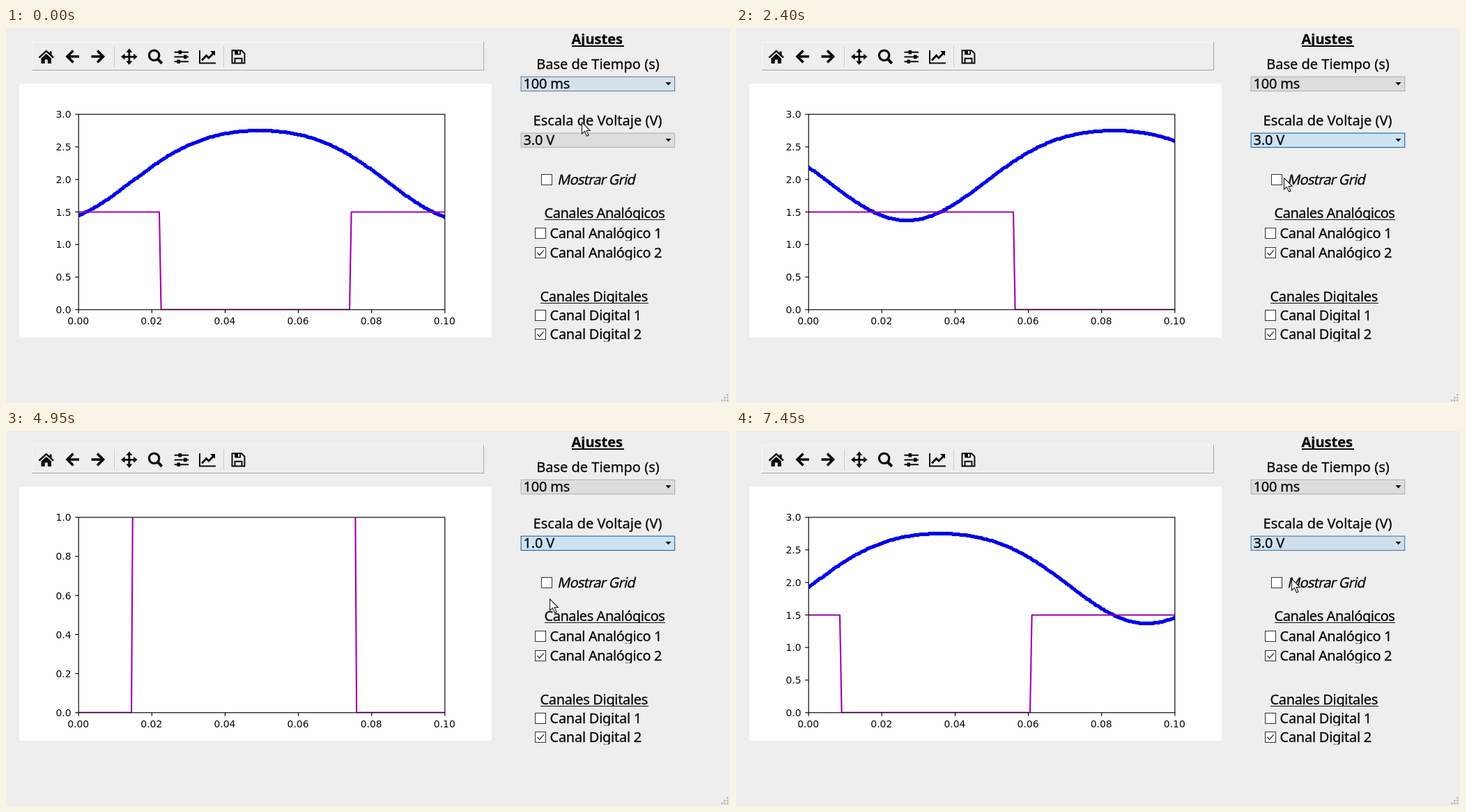
These frames come from a looping animation (1039x539 px, 7.7 s). An HTML page with a canvas:

```html
<!DOCTYPE html>
<html lang="es">
<head>
<meta charset="utf-8">
<title>Ajustes</title>
<style>
html, body { margin: 0; width: 100%; height: 100%; overflow: hidden; background: #eee; }
canvas { display: block; width: 1039px; height: 539px; }
</style>
</head>
<body>
<canvas id="stage"></canvas>
<script>
const W = 1039, H = 539, LOOP = 7700;
const canvas = document.getElementById('stage');
const dpr = window.devicePixelRatio || 1;
canvas.width = W * dpr;
canvas.height = H * dpr;
const g = canvas.getContext('2d');
g.scale(dpr, dpr);

// start ms, x of the wave crest, voltage scale, pointer x, pointer y, mode
const STEPS = [
  [0, 364, '3.0', 826, 135, 'leave'],
  [350, 295, '3.0', 822, 148, 'idle'],
  [700, 225, '3.0', 818, 173, 'hover'],
  [800, 225, '3.0', 818, 173, 'press'],
  [1100, 305, '3.0', 812, 182, 'press'],
  [1500, 420, '3.0', 800, 197, 'press'],
  [2400, 542, '3.0', 786, 215, 'press'],
  [2700, 480, '1.0', 786, 228, 'grid'],
  [3700, 400, '1.0', 786, 242, 'grid'],
  [3850, 400, '1.0', 812, 171, 'hover'],
  [3950, 430, '1.0', 815, 169, 'press'],
  [4300, 257, '1.0', 812, 180, 'press'],
  [4700, 300, '1.0', 792, 216, 'press'],
  [4950, 51, '1.0', 780, 241, 'press'],
  [5300, 180, '0.3', 783, 250, 'fade'],
  [5550, 240, '0.3', 800, 222, 'grid'],
  [6000, 305.6, '0.3', 822, 172, 'hover'],
  [6400, 380, '0.3', 812, 212, 'grid'],
  [6900, 340, '0.3', 806, 200, 'press'],
  [7450, 293, '3.0', 797, 212, 'fade']
];

const TICK = { '3.0': 0.5, '1.0': 0.2, '0.3': 0.05 };
const STATUS = { hover: 'Ajustar escala de voltaje', grid: 'Colocar Grid en la grafica' };
const COMBO = {
  idle: ['#dddddd', '#adadad'],
  leave: ['#d5e1ea', '#55789a'],
  fade: ['#d0dfeb', '#33729f'],
  hover: ['#e5f1fa', '#1878b0'],
  press: ['#cce3f4', '#10558c']
};
const INK = '#0a0a0a', UI = '20px "Noto Sans", sans-serif';
const AXES = { x: 104.2, y: 124.1, w: 525.6, h: 280.7 };
const PERIOD = 593.5, FALL = -144, RISE = 129, SAMPLE = AXES.w / 200;

function rect(x, y, w, h, fill) {
  g.fillStyle = fill;
  g.fillRect(x, y, w, h);
}

function box(x, y, w, h, fill, border) {
  rect(x, y, w, h, border);
  rect(x + 1, y + 1, w - 2, h - 2, fill);
}

function stroke(d, width, color = INK) {
  g.lineWidth = width;
  g.strokeStyle = color;
  g.stroke(new Path2D(d));
}

function fill(d, color = INK) {
  g.fillStyle = color;
  g.fill(new Path2D(d));
}

function text(str, x, y, font, align = 'left') {
  g.font = font;
  g.textAlign = align;
  g.fillStyle = INK;
  g.fillText(str, x, y);
}

// panel text: slightly heavier than regular, with its own tracking
function label(str, x, y, track = 0, align = 'left', font = UI) {
  g.letterSpacing = track + 'px';
  text(str, x, y, font, align);
  g.lineWidth = 0.3;
  g.strokeStyle = INK;
  g.strokeText(str, x, y);
  g.letterSpacing = '0px';
}

function clipped(x, y, w, h, draw) {
  g.save();
  g.beginPath();
  g.rect(x, y, w, h);
  g.clip();
  draw();
  g.restore();
}

function toolbar() {
  rect(37, 20, 649, 41, '#a6a6a6');
  rect(37, 20, 648, 40, '#f8f8f8');
  rect(38, 21, 647, 39, '#eeeeee');
  rect(155, 26, 1, 30, '#cccccc');
  rect(312, 26, 1, 30, '#cccccc');
  // home
  stroke('M47.5 42.5L57.8 33.2L68 42.5', 2.4);
  fill('M50.5 43.5L57.8 37L65 43.5V51H59.8V45.5H55.8V51H50.5Z M62.6 33.5h3v6h-3z');
  // back, forward
  stroke('M89 41H105 M96.5 32.5L88 41L96.5 49.5', 3.7);
  stroke('M122.5 41H138.5 M131 32.5L139.5 41L131 49.5', 3.7);
  // pan
  stroke('M176.8 33V50 M168 41.3H185.5', 2.8);
  fill('M176.8 29.5l4.5 5.5h-9z M176.8 53l4.5-5.5h-9z M165 41.3l5.5-4.5v9z M188.6 41.3l-5.5-4.5v9z');
  // zoom
  stroke('M219.8 39.3a7.2 7.2 0 1 1-14.4 0a7.2 7.2 0 1 1 14.4 0z', 3.2);
  stroke('M217.5 44.5L223.8 50.8', 4);
  // sliders
  stroke('M241.5 34.7H262 M241.5 41.5H262 M241.5 48.3H262', 2);
  fill('M247.5 32h4.5v5.4h-4.5z M255 38.8h4.5v5.4h-4.5z M245.5 45.6h4.5v5.4h-4.5z');
  // chart
  stroke('M278 32V50.5H301', 2);
  stroke('M281 46.5L287.5 39.5L291 43L298 36', 2.9);
  fill('M293 33H300V40Z');
  // save
  stroke('M324.5 32.3H338L342.4 36.7V50.5H324.5Z M328.5 50V43.7H338.5V50', 2);
  fill('M328 32h9v6.5h-9z');
  rect(333, 33, 2.2, 4, '#eeeeee');
}

// flat crest, sharp trough
function wave(px, crest) {
  const a = (px - crest) / PERIOD * 2 * Math.PI;
  return 2.15 + 0.69 * Math.cos(a) - 0.09 * Math.cos(2 * a);
}

function plot(crest, scale) {
  const { x, y, w, h } = AXES, max = +scale;
  const py = v => y + h - v / max * h;
  rect(19, 80, 678, 365, '#fefefe');

  clipped(x, y, w, h + 0.5, () => {
    // one dot per sample, snapped to the pixel grid
    g.fillStyle = '#0000ea';
    for (let i = 0; i <= 200; i++) {
      const px = x + i * SAMPLE;
      g.beginPath();
      g.arc(Math.floor(px) + 0.5, Math.floor(py(wave(px, crest))) + 0.5, 2.75, 0, 7);
      g.fill();
    }

    g.lineJoin = 'round';
    g.beginPath();
    for (let k = -2; k <= 2; k++) {
      const c = crest + k * PERIOD;
      g.lineTo(c + FALL, py(1.5));
      g.lineTo(c + FALL + SAMPLE, py(0));
      g.lineTo(c + RISE, py(0));
      g.lineTo(c + RISE + SAMPLE, py(1.5));
    }
    g.lineWidth = 2.1;
    g.strokeStyle = '#a000a8';
    g.stroke();
    g.lineJoin = 'miter';
  });

  g.lineWidth = 1.2;
  g.strokeStyle = INK;
  g.strokeRect(x, y, w, h);
  const font = '13.9px "DejaVu Sans", sans-serif';
  for (let i = 0; i <= 5; i++) {
    const tx = x + w * i / 5;
    stroke(`M${tx} ${y + h}v5`, 1.2);
    text((i * 0.02).toFixed(2), tx - 0.5, 425.5, font, 'center');
  }
  const step = TICK[scale], digits = max < 1 ? 2 : 1;
  for (let i = 0; i <= Math.round(max / step); i++) {
    const ty = py(i * step);
    stroke(`M${x} ${ty}h-5`, 1.2);
    text((i * step).toFixed(digits), 93.5, ty + 5.2, font, 'right');
  }
}

function combo(y, value, style) {
  const [inner, border] = COMBO[style];
  box(738.6, y - 0.4, 221.6, 21.5, inner, border);
  label(value, 742.5, y + 17.3, -0.2);
  fill(`M946.5 ${y + 8}h8l-4 4.5z`);
}

function check(x, y, on, border = '#333333') {
  box(x, y, 16, 16, '#ffffff', border);
  if (on) stroke(`M${x + 3.5} ${y + 8}l3.2 3.4l6-7`, 1.4, '#333333');
}

function channel(name, y, track, on) {
  check(759, y - 15, on);
  clipped(755, y - 20, 200, 23.5, () => label(name, 780.5, y, track));
}

function heading(title, x0, x1, y, track, thick = 1, font = UI) {
  clipped(x0 - 4, y - 22, x1 - x0 + 8, 25, () => label(title, x0 - 0.5, y, track, 'left', font));
  rect(x0, y + 2, x1 - x0, thick, INK);
}

function settings(scale, mode) {
  heading('Ajustes', 812, 887, 23, 0, 2, 'bold ' + UI);
  label('Base de Tiempo (s)', 849.5, 59, 0, 'center');
  combo(70, '100 ms', mode === 'leave' ? 'leave' : 'idle');
  label('Escala de Voltaje (V)', 849, 140, 0, 'center');
  combo(151, scale + ' V', mode in COMBO && mode !== 'leave' ? mode : 'idle');

  check(768, 210, false, mode === 'grid' ? '#2a78b8' : '#333333');
  g.save();
  g.translate(791, 225);
  g.transform(1, 0, -0.22, 1, 0, 0);
  label('Mostrar Grid', 0, 0, -0.75);
  g.restore();

  heading('Canales Analógicos', 773, 946, 273, -0.45);
  channel('Canal Analógico 1', 302, -0.4, false);
  channel('Canal Analógico 2', 330, -0.4, true);
  heading('Canales Digitales', 767, 922, 393, -0.35);
  channel('Canal Digital 1', 420, -0.25, false);
  channel('Canal Digital 2', 447, -0.25, true);
}

function grip() {
  for (let r = 0; r < 3; r++)
    for (let c = 2 - r; c < 3; c++) rect(1026 + c * 4, 526 + r * 4, 2.6, 2.6, '#bcbcbc');
}

function pointer(x, y) {
  g.save();
  g.translate(x + 0.5, y + 0.5);
  const d = 'M0 0V16.5L3.9 12.9L7 19.8L9.6 18.7L6.6 12H11.8Z';
  fill(d, '#ffffff');
  stroke(d, 1.1, '#1a1a1a');
  g.restore();
}

function draw([, crest, scale, x, y, mode]) {
  rect(0, 0, W, H, '#eeeeee');
  toolbar();
  plot(crest, scale);
  settings(scale, mode);
  if (STATUS[mode]) text(STATUS[mode], 6, 532, '14.6px "Open Sans", sans-serif');
  grip();
  pointer(x, y);
}

let shown = null;
function tick() {
  const t = performance.now() % LOOP;
  const step = STEPS.findLast(s => s[0] <= t);
  if (step !== shown) draw(shown = step);
  requestAnimationFrame(tick);
}
tick();
</script>
</body>
</html>
```
